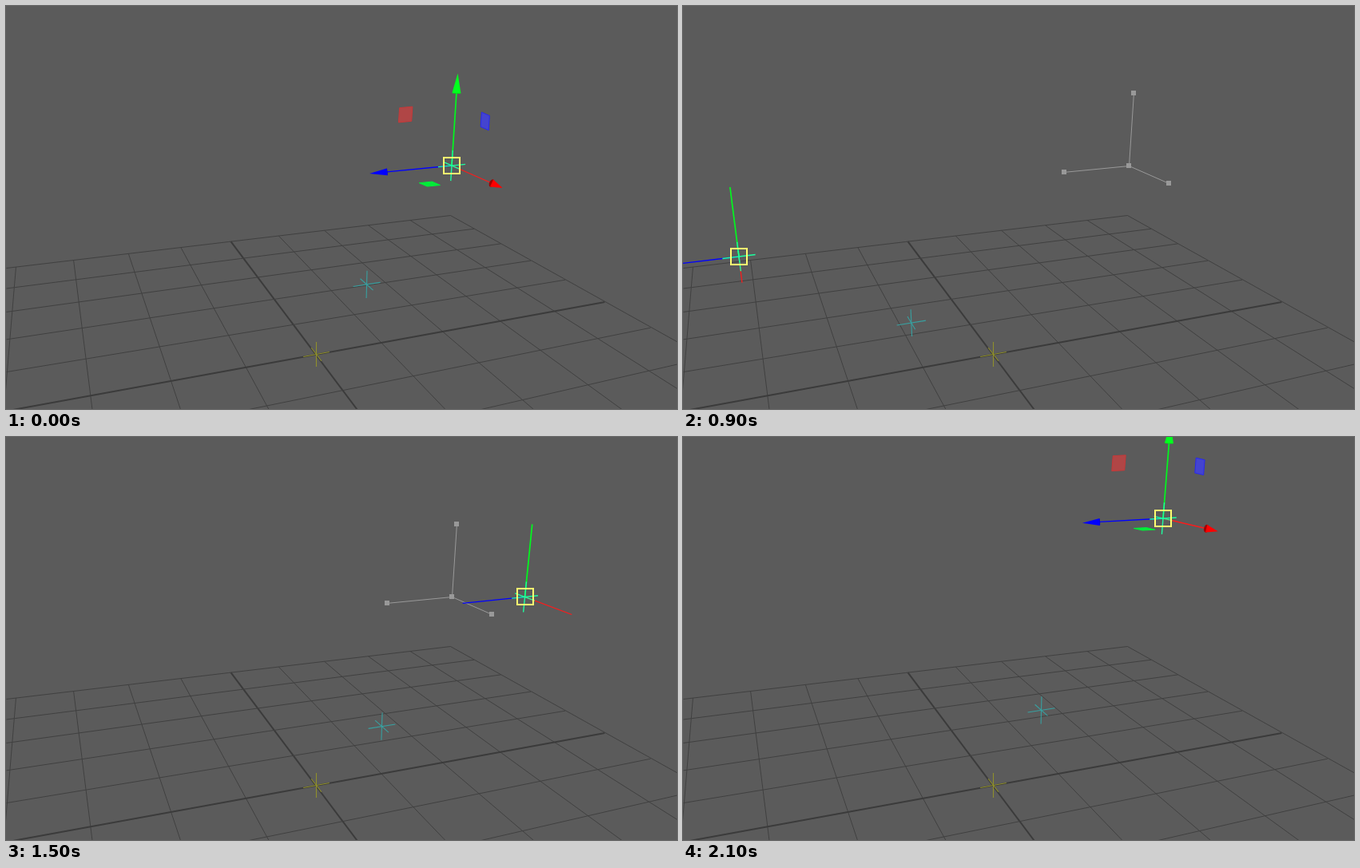
Write an HTML page with a canvas that moves like this. It is 840x505 px and loops after 2400 ms.

```html
<!DOCTYPE html>
<html>
<head>
<meta charset="utf-8">
<style>
  html, body { margin: 0; height: 100%; overflow: hidden; background: #5b5b5b; }
  canvas { display: block; }
</style>
</head>
<body>
<canvas id="stage" width="840" height="505"></canvas>
<script>
const ctx = document.getElementById('stage').getContext('2d');
const LOOP = 2400, STEP = 60, DRAG_START = 240, DRAG_END = 2100;
const HOME = [558, 200], ORIGIN = [388, 436];

// Evenly timed points of the drag, one every KEY_GAP ms from KEY_START
const KEY_START = 180, KEY_GAP = 240;
const KEYS = [HOME, [410, 176], [161, 245], [70, 314], [341, 238],
              [553, 221], [718, 174], [705, 110], [601, 102]];

// Catmull-Rom spline through KEYS
function dragPoint(time) {
  const last = KEYS.length - 1;
  const at = Math.min(Math.max((time - KEY_START) / KEY_GAP, 0), last);
  const i = Math.min(Math.floor(at), last - 1), s = at - i;
  const key = n => KEYS[Math.min(Math.max(n, 0), last)];
  return [0, 1].map(k => {
    const [a, b, c, d] = [-1, 0, 1, 2].map(n => key(i + n)[k]);
    return b + s / 2 * (c - a + s * (2 * a - 5 * b + 4 * c - d + s * (3 * (b - c) + d - a)));
  });
}

const along = (p, d, k) => [p[0] + d[0] * k, p[1] + d[1] * k];

// Each world axis points away from, or towards, its vanishing point
const fromVanishing = ([x, y], vx, vy, k) => [(x - vx) * k, (y - vy) * k];
const axes = p => ({
  x: fromVanishing(p, 28, -33, .0945),
  y: fromVanishing(p, 388, 2800, .035),
  z: fromVanishing(p, 2874, -25, .035)
});

// Unit vector towards p, which looks shorter where it tilts away
function normalised(p) {
  const away = [p[0] - ORIGIN[0], p[1] - ORIGIN[1]], dist = Math.hypot(...away);
  return along(ORIGIN, away, (122 - 4100 / dist) / dist);
}

function line(a, b, color, width = 1) {
  ctx.strokeStyle = color;
  ctx.lineWidth = width;
  ctx.beginPath();
  ctx.moveTo(...a);
  ctx.lineTo(...b);
  ctx.stroke();
}

function shape(points, fill, stroke) {
  ctx.beginPath();
  points.forEach(p => ctx.lineTo(...p));
  ctx.closePath();
  ctx.fillStyle = fill;
  ctx.fill();
  if (stroke) {
    ctx.strokeStyle = stroke;
    ctx.lineWidth = 1;
    ctx.stroke();
  }
}

function grid() {
  const ink = i => i === 5 ? ['#3b3b3b', 2] : ['#404040', 1];
  for (let u = 0; u < 10; u++) {
    const x = (556 - 60.69 * u) / (1 - .02024 * u);
    line([x, 328 - x * 66 / 556], [439 + 110.5 * (5 - u), 505], ...ink(u));
  }
  for (let v = 0; v < 9; v++) {
    const x = (556 - 2.3 * v) / (1 - .0546 * v);
    line([0, (328 + 1.83 * v) / (1 - .067 * v)], [x, 262 + (x - 556) * .562], ...ink(v));
  }
}

function locator(p, size, color, width) {
  for (const d of Object.values(axes(p)))
    line(along(p, d, -size), along(p, d, size), color, width);
}

function ghost() {
  const gray = '#999';
  const dot = p => {
    ctx.fillStyle = gray;
    ctx.fillRect(Math.round(p[0]) - 3.5, Math.round(p[1]) - 3.5, 6, 6);
  };
  dot(HOME);
  for (const d of Object.values(axes(HOME))) {
    const end = along(HOME, d, 1);
    line(HOME, end, gray);
    dot(end);
  }
}

function cone(p, d, half, color, base) {
  const len = Math.hypot(...d), side = [-d[1] / len, d[0] / len];
  const foot = along(p, d, 1);
  ctx.fillStyle = base;
  ctx.beginPath();
  ctx.ellipse(...foot, half * (len < 70 ? .6 : .15), half, Math.atan2(d[1], d[0]), 0, 7);
  ctx.fill();
  shape([along(foot, side, half), along(p, d, 1.27), along(foot, side, -half)], color);
}

// Square handle lying in the plane of two axes
function plane(p, a, ka, b, kb, fill, stroke) {
  const corner = (i, j) => along(along(p, a, ka + i * .1), b, kb + j * .1);
  shape([corner(-1, -1), corner(1, -1), corner(1, 1), corner(-1, 1)], fill, stroke);
}

function manipulator(p, dragging) {
  const { x, y, z } = axes(p);
  line(p, along(p, z, 1), '#00f', 1.3);
  line(p, along(p, x, 1), '#fa1c1c', 1.3);
  line(p, along(p, y, 1), '#00fa1e', 1.7);
  if (!dragging) {
    plane(p, z, .77, y, .77, '#b04646', '#c83838');
    plane(p, x, .74, y, .79, '#4444d0', '#2828f0');
    plane(p, x, .76, z, .81, '#00ec38', '#00ec38');
    cone(p, z, 4.5, '#00f', '#0000d0');
    cone(p, x, 5, '#f00', '#a00000');
    cone(p, y, 5.5, '#00ff1e', '#00e01a');
  }
  locator(p, .21, '#1effa0', 1.4);
  ctx.strokeStyle = '#ffff70';
  ctx.lineWidth = 2;
  ctx.strokeRect(Math.round(p[0]) - 10, Math.round(p[1]) - 10, 20, 20);
}

function draw(now) {
  const time = Math.floor(now % LOOP / STEP) * STEP;
  const dragging = time >= DRAG_START && time < DRAG_END;
  const p = dragPoint(time < DRAG_START ? 0 : time);

  ctx.fillStyle = '#5b5b5b';
  ctx.fillRect(0, 0, 840, 505);
  ctx.save();
  ctx.translate(.5, .5); // crisp thin lines
  grid();
  locator(ORIGIN, .187, '#90902c', 1.1);
  locator(normalised(p), .2, '#38a0a0', 1.1);
  if (dragging) ghost();
  ctx.restore();
  manipulator(p, dragging);
}

const start = performance.now();
function tick() {
  draw(performance.now() - start);
  requestAnimationFrame(tick);
}
tick();
</script>
</body>
</html>
```
